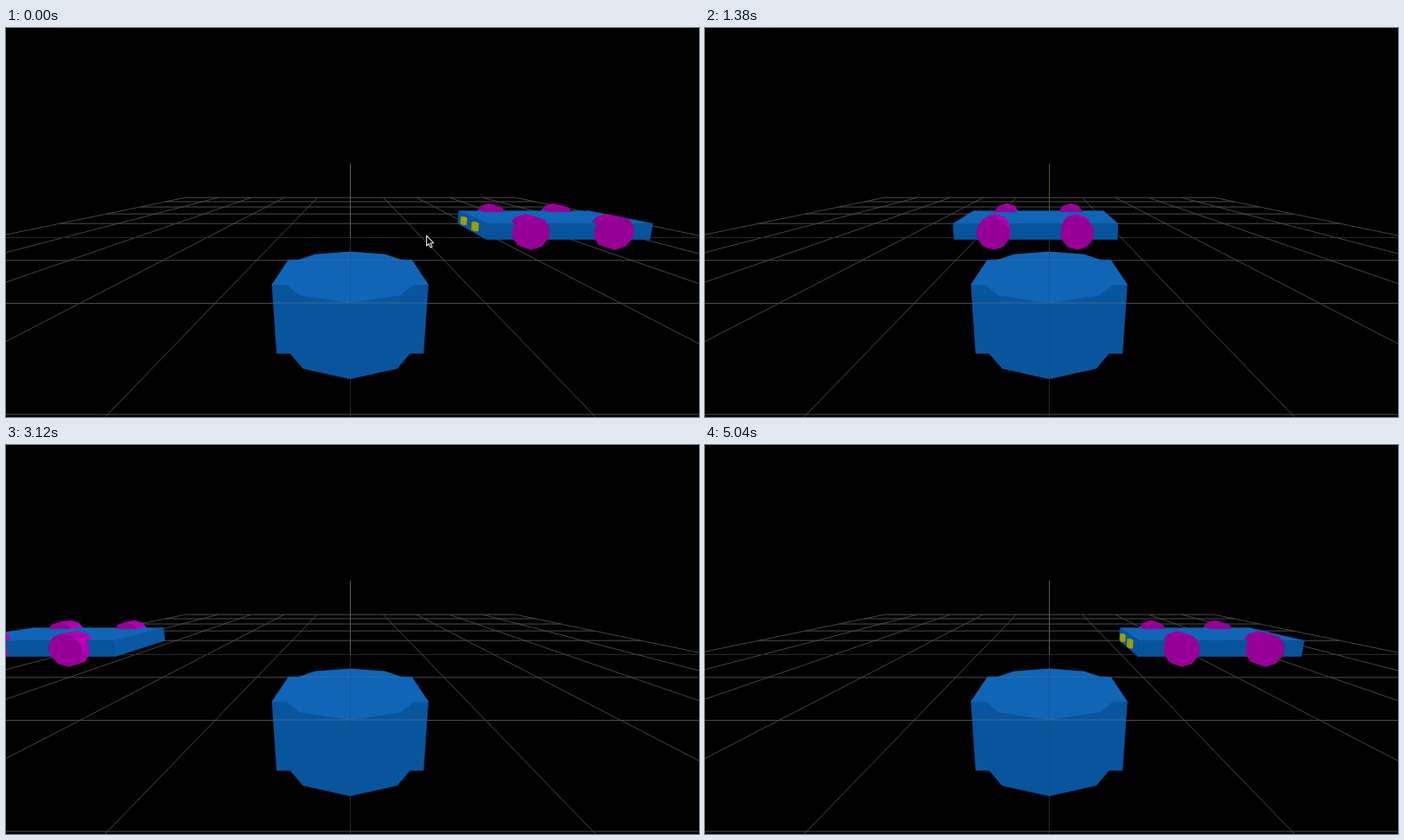
Write an HTML page with a canvas that moves like this. It is 800 by 450 pixels and loops after 5100 ms.

```html
<!DOCTYPE html>
<html lang="en">
<head>
<meta charset="utf-8">
<title>Car on a grid</title>
<style>
  html, body { margin: 0; width: 100%; height: 100%; overflow: hidden; background: #000; }
  canvas { display: block; width: 800px; height: 450px; }
</style>
</head>
<body>
<canvas id="stage" width="800" height="450"></canvas>
<script>
const ctx = document.getElementById('stage').getContext('2d');
const LOOP = 5100, STEP = 60;

// Pinhole camera tilted down; one unit is one grid cell.
const FOCAL = 346, HEIGHT = 1.0166, DIST = 4.058, CX = 397.5, CY = 225;
const TILT = Math.atan(68.3 / FOCAL), COS = Math.cos(TILT), SIN = Math.sin(TILT);

function project(x, y, z) {
  const drop = HEIGHT - y, away = DIST - z;
  const s = FOCAL / (COS * away + SIN * drop);
  return [CX + x * s, CY + (drop * COS - away * SIN) * s];
}

function path(points) {
  ctx.beginPath();
  points.forEach(([x, y]) => ctx.lineTo(x, y));
}

function fill(points, color) {
  path(points);
  ctx.closePath();
  ctx.fillStyle = ctx.strokeStyle = color;
  ctx.lineWidth = 0.4;
  ctx.fill();
  ctx.stroke();
}

function line(a, b, color, width = 1) {
  path([a, b]);
  ctx.strokeStyle = color;
  ctx.lineWidth = width;
  ctx.stroke();
}

function facesCamera(points) {
  let area = 0;
  points.forEach(([x, y], i) => {
    const [u, v] = points[(i + 1) % points.length];
    area += x * v - u * y;
  });
  return area < 0;
}

// Extrudes a counter-clockwise outline from z0 (far) to z1 (near).
function prism(outline, z0, z1, shade) {
  outline.forEach(([ax, ay], i) => {
    const [bx, by] = outline[(i + 1) % outline.length];
    const len = Math.hypot(bx - ax, by - ay) || 1;
    const quad = [project(bx, by, z1), project(ax, ay, z1), project(ax, ay, z0), project(bx, by, z0)];
    if (facesCamera(quad)) fill(quad, shade((by - ay) / len, (ax - bx) / len));
  });
  fill(outline.map(([x, y]) => project(x, y, z1)), shade(0, 0));
}

const rect = (x0, y0, x1, y1) => [[x0, y0], [x1, y0], [x1, y1], [x0, y1]];

const bodyShade = (nx, ny) => ny > 0.5 ? 'rgb(16,101,182)' : nx > 0.5 ? 'rgb(9,88,162)' : 'rgb(8,84,156)';
const lightShade = (nx, ny) => ny > 0.5 ? 'rgb(172,172,0)' : 'rgb(160,160,0)';
const wheelShade = (nx, ny) => {
  const v = Math.round(150 + 36 * Math.max(0, 0.5 * ny + 0.85 * nx));
  return `rgb(${v},0,${v})`;
};

const SIDES = 10, RADIUS = 0.2, DECK = 0.3;

function wheelOutline(x) {
  return Array.from({ length: SIDES }, (_, i) => {
    const a = Math.PI / 2 + i * 2 * Math.PI / SIDES;
    return [x + RADIUS * Math.cos(a), RADIUS + RADIUS * Math.sin(a)];
  });
}

// Keeps the part of a wheel that stands above the deck.
function aboveDeck(outline) {
  const out = [];
  outline.forEach(([ax, ay], i) => {
    const [bx, by] = outline[(i + 1) % outline.length];
    if (ay >= DECK) out.push([ax, ay]);
    if ((ay >= DECK) !== (by >= DECK)) out.push([ax + (bx - ax) * (DECK - ay) / (by - ay), DECK]);
  });
  return out;
}

function drawCar(x) {
  const wheels = [x - 0.5, x + 0.5].map(wheelOutline);
  if (x > 0) wheels.reverse();
  const lights = () => [-0.2, 0.2].forEach(z =>
    prism(rect(x - 1.05, 0.15, x - 1, 0.25), z - 0.05, z + 0.05, lightShade));
  const noseVisible = x > 1;

  wheels.forEach(w => prism(w, -0.6, -0.5, wheelShade));
  if (!noseVisible) lights();
  prism(rect(x - 1, 0.1, x + 1, DECK), -0.5, 0.5, bodyShade);
  if (noseVisible) lights();
  wheels.forEach(w => prism(aboveDeck(w), -0.5, -0.4, wheelShade));
  wheels.forEach(w => {
    prism(aboveDeck(w), 0.4, 0.5, wheelShade);
    prism(w, 0.5, 0.6, wheelShade);
  });
}

function drawGrid(green) {
  for (let i = -5; i <= 5; i++) {
    const color = i ? '#4c4c4c' : '#282828';
    line(project(i, 0, -5), project(i, 0, 4), color, i ? 0.9 : 1);
    if (i < 4) line(project(-5, 0, i), project(5, 0, i), color);
  }
  line(project(0, HEIGHT, 0), project(0, 0, 0), green ? '#3c5c34' : '#5a5c56');
}

// Mirrors the left half of an outline about the centre line.
const mirror = half => half.concat(half.slice().reverse().map(([x, y]) => [2 * CX - 0.5 - x, y]));

const BLOCK = mirror([[397, 259], [357, 262], [339, 268], [326, 268.5], [307, 297],
  [312.5, 376.5], [328, 376.5], [343, 394], [397, 406]]);
const BLOCK_TOP = mirror([[397, 259], [357, 262], [339, 268], [326, 268.5], [307, 297],
  [324, 297], [339, 309], [397, 318]]);

function drawBlock() {
  fill(BLOCK, 'rgb(8,85,157)');
  fill(BLOCK_TOP, 'rgb(16,101,182)');
  line([309, 318], [486, 318], 'rgba(120,125,125,0.5)');
  line([338, 268.5], [457, 268.5], 'rgba(110,120,125,0.3)');
  line([397.5, 260], [397.5, 405], 'rgba(30,60,90,0.35)');
}

function drawCursor() {
  path([[485.5, 240], [485.5, 252], [488, 249.7], [490.2, 254], [492, 253], [490, 249], [493.5, 248.6]]);
  ctx.closePath();
  ctx.fillStyle = '#000';
  ctx.strokeStyle = '#e6e6e6';
  ctx.lineWidth = 1.1;
  ctx.fill();
  ctx.stroke();
}

// Unwrapped car position over time; the track wraps from -5 to 5.
const TRACK = [[0, 2.665], [900, 0.849], [1920, -1.31], [2640, -2.847],
  [3120, -3.874], [3960, -5.642], [5040, -7.914]];

function carX(t) {
  let i = 0;
  while (i < TRACK.length - 2 && t > TRACK[i + 1][0]) i++;
  const [t0, x0] = TRACK[i], [t1, x1] = TRACK[i + 1];
  const x = x0 + (x1 - x0) * (t - t0) / (t1 - t0);
  return x < -5 ? x + 10 : x;
}

const start = performance.now();

function frame(now) {
  const t = Math.floor((Math.max(0, now - start) % LOOP) / STEP) * STEP;
  ctx.fillStyle = '#000';
  ctx.fillRect(0, 0, 800, 450);
  ctx.lineJoin = 'round';
  drawGrid(t >= 540 && t < 2160);
  drawCar(carX(t));
  drawBlock();
  if (t < 480) drawCursor();
  requestAnimationFrame(frame);
}
frame(start);
</script>
</body>
</html>
```
